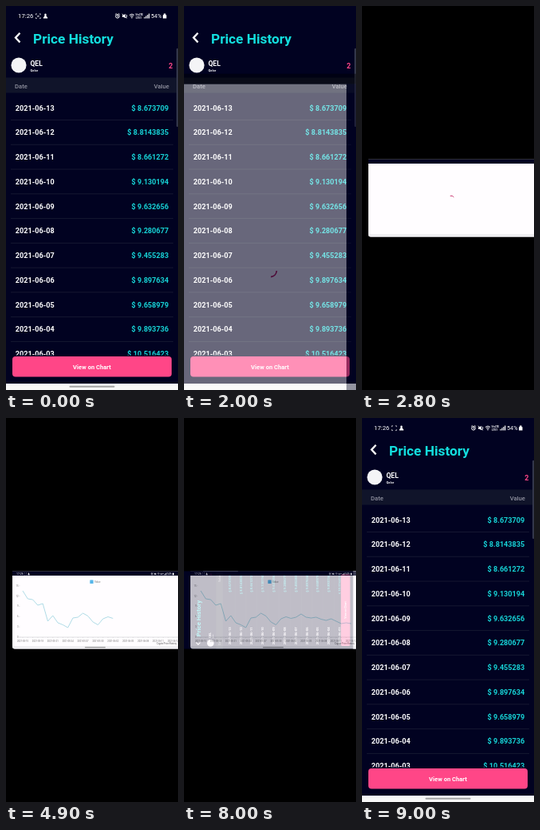
An HTML page that plays this animation: 216 px wide and 480 px high, repeating every 9.1 s.

```html
<!DOCTYPE html>
<html lang="en">
<head>
<meta charset="utf-8">
<title>Price History</title>
<style>
html, body { margin: 0; width: 100%; height: 100%; overflow: hidden; background: #000; }
svg { display: block; width: 100vw; height: 100vh; font-family: Roboto, sans-serif; }
.b { font-weight: 700; }
.m { font-weight: 500; }
.e { text-anchor: end; }
.c { text-anchor: middle; }
</style>
</head>
<body>
<svg viewBox="0 0 216 480">
  <defs>
    <clipPath id="listClip"><rect y="108" width="216" height="328.5"/></clipPath>
    <clipPath id="wideClip"><path d="M8 191.5H216V288.6H11Q8 288.6 8 285.6Z"/></clipPath>
    <clipPath id="lineClip"><rect id="reveal" x="8" y="198" width="0" height="80"/></clipPath>
    <g id="statusL" fill="#fff">
      <text x="15" y="15.4" font-size="7.8">17:26</text>
      <path d="M37.5 11.2V9.8H38.9M41.9 9.8H43.3V11.2M43.3 14.2V15.6H41.9M38.9 15.6H37.5V14.2" fill="none" stroke="#fff" stroke-width=".7"/>
      <path class="rec" d="M39.3 11.6L41.5 13.8M41.5 11.6L39.3 13.8" stroke="#fff" stroke-width=".8"/>
      <path d="M49.5 9.4a1.2 1.2 0 0 1 1 1.9L50.8 13L52.2 14.3V15.4H46.9V14.3L48.2 13L48.5 11.3A1.2 1.2 0 0 1 49.5 9.4Z"/>
    </g>
    <g id="statusR" fill="#fff">
      <g fill="none" stroke="#fff" stroke-width="1">
        <circle cx="140" cy="12.8" r="2.3"/>
        <path d="M140 11.3V13H141.2M137.3 10.4L138.6 9.3M142.7 10.4L141.4 9.3"/>
        <path d="M146 9.8L151.6 15.4M151 10.8Q152.6 12.6 151 14.5"/>
        <path d="M155 11.4Q158 8.8 161 11.4M156.2 13Q158 11.4 159.8 13"/>
      </g>
      <path d="M146 11.5H147.6L149.8 9.8V15.2L147.6 13.8H146Z"/>
      <circle cx="158" cy="14.6" r=".8"/>
      <text x="162.6" y="12.3" font-size="3.4" class="b">VoLTE</text>
      <text x="163" y="15.8" font-size="3.4" class="b">LTE1</text>
      <path d="M173.4 15.6V14H174.6V15.6ZM175.3 15.6V12.6H176.5V15.6ZM177.2 15.6V11H178.4V15.6ZM179.1 15.6V9.5H180.3V15.6Z"/>
      <text x="182" y="15.4" font-size="7.3">54%</text>
      <path d="M197 11.2H198V9.6H200.5V11.2H201.5V15.6H197Z"/>
    </g>
    <path id="arc" d="M8.4 .7A8.5 8.5 0 0 1 1.2 8.4" fill="none" stroke="#c2185b" stroke-width="1.7"/>
  </defs>

  <g id="page">
    <rect width="216" height="480" fill="#010221"/>
    <path d="M17.5 33.8L12 39.6L17.5 45.4" fill="none" stroke="#fff" stroke-width="2.3"/>
    <text x="34" y="47" font-size="17.3" class="b" fill="#13dede">Price History</text>
    <circle cx="16" cy="74" r="9.6" fill="#f4f4f6"/>
    <text x="30.5" y="75.2" font-size="8.5" class="b" fill="#fff">QEL</text>
    <text x="30.5" y="82.4" font-size="4" class="b" fill="#fff">Qelor</text>
    <text x="209.5" y="78.2" font-size="9" class="b e" fill="#ff4687">2</text>
    <rect y="89.5" width="216" height="19.1" fill="#10142a"/>
    <g font-size="7.7" class="m" fill="#8f919f">
      <text x="11" y="102.7">Date</text>
      <text x="205" y="102.7" class="e">Value</text>
    </g>
    <g id="rows" clip-path="url(#listClip)" font-size="9.15" class="b"></g>
    <rect x="8" y="438" width="200" height="25.5" rx="4" fill="#ff4687"/>
    <text x="108" y="454" font-size="7.6" class="b c" fill="#fff">View on Chart</text>
    <rect x="214" y="53" width="3" height="98" rx="1" fill="#33364a"/>
    <rect y="472" width="216" height="8" fill="#f8f8f8"/>
    <g id="chrome">
      <use href="#statusL"/><use href="#statusR"/>
      <rect x="79.5" y="474.8" width="57" height="2" rx="1" fill="#a4a4a4"/>
    </g>
  </g>

  <!-- the chart screen turned upright, while it opens -->
  <g id="sheet">
    <rect width="216" height="13" fill="#000"/>
    <rect y="13" width="204" height="467" fill="#fffdff"/>
    <rect x="204" y="13" width="12" height="467" fill="#010221"/>
    <use id="spinTall" href="#arc"/>
  </g>

  <g id="wide" clip-path="url(#wideClip)">
    <rect x="8" y="191.5" width="208" height="98" fill="#fffdff"/>
    <rect x="8" y="191.5" width="208" height="5.5" fill="#010221"/>
    <rect x="8" y="285" width="208" height="4" fill="#f1f0f3"/>
    <use id="spinWide" href="#arc"/>
    <g id="wideChrome">
      <use href="#statusL" transform="translate(6.3 189.2) scale(.45)"/>
      <use href="#statusR" transform="translate(120.3 189.2) scale(.45)"/>
      <rect x="99" y="286.3" width="26" height=".9" rx=".4" fill="#858585"/>
    </g>
    <g id="chart" fill="#777">
      <rect x="105.4" y="202.5" width="4.3" height="4.4" rx=".5" fill="#56b6e9"/>
      <text x="111" y="205.9" font-size="3.1">Value</text>
      <path d="M17 274H216" stroke="#d2d2d6" stroke-width=".7"/>
      <g id="axes" font-size="2.8"></g>
      <text x="214" y="283.4" font-size="2.8" class="e" fill="#555">Crypto Price History</text>
      <polyline id="line" clip-path="url(#lineClip)" fill="none" stroke="#a6d7e4" stroke-width=".9" stroke-linejoin="round"/>
    </g>
  </g>
</svg>
<script>
const LOOP = 9100;
const $ = id => document.getElementById(id);
const ramp = (t, a, b) => Math.min(1, Math.max(0, (t - a) / (b - a)));
const show = (id, on) => $(id).setAttribute('display', on ? 'inline' : 'none');
const fade = (id, v) => $(id).setAttribute('opacity', v);
const place = (id, v) => $(id).setAttribute('transform', v);

const prices = ['8.673709', '8.8143835', '8.661272', '9.130194', '9.632656', '9.280677',
  '9.455283', '9.897634', '9.658979', '9.893736', '10.516423'];
$('rows').innerHTML = prices.map((p, i) => {
  const y = 130.5 + i * 30.77;
  const day = String(13 - i).padStart(2, '0');
  return `<text x="11.7" y="${y}" fill="#fff">2021-06-${day}</text>
    <text x="204.3" y="${y}" class="e" fill="#17d3d6">$ ${p}</text>
    <path d="M6 ${y + 12}H210" stroke="#1b1d35" stroke-width=".8"/>`;
}).join('');

const X0 = 21, STEP = 6.3;
const heights = [216, 226, 227, 234, 232, 254, 247, 256, 258.5, 262, 250, 249, 244, 247.5, 255, 258.5,
  251, 248.5, 250.5, 249, 245, 249, 250, 249, 251.5, 253, 251, 254, 257, 256, 257];
$('line').setAttribute('points', heights.map((y, i) => `${X0 + i * STEP},${y}`).join(' '));

let labels = '';
for (let i = 0; i < 6; i++) {
  const y = 274 - i * 12.85;
  labels += `<text x="15.6" y="${y + 1}" class="e">${i * 3}</text>
    <path d="M16.2 ${y}H17.4" stroke="#bbb" stroke-width=".4"/>`;
}
for (let i = 0; i < 11; i++) {
  const x = X0 + i * STEP * 3;
  const date = new Date(Date.UTC(2021, 4, 15 + i * 3)).toISOString().slice(0, 10);
  labels += `<text x="${x}" y="279.9" class="c">${date}</text>`;
}
for (let i = 0; i < heights.length; i++) {
  labels += `<path d="M${X0 + i * STEP} 274v.9" stroke="#bbb" stroke-width=".4"/>`;
}
$('axes').innerHTML = labels;

const recs = document.querySelectorAll('.rec');

function draw(t) {
  const blink = Math.floor((t < 4000 ? t : t - 4200) / 500) % 2 === 0;
  recs.forEach(r => r.setAttribute('opacity', blink ? 1 : 0));

  const landscape = t >= 2500 && t < 8500;
  const closing = t >= 7900;
  show('page', !landscape || closing);
  place('page', landscape ? 'translate(0 288.6) rotate(-90) scale(.45)' : '');
  fade('chrome', closing ? ramp(t, 8500, 8900) : 1 - ramp(t, 1300, 1700));

  // loading sheet rises while it becomes opaque
  const p = ramp(t, 1700, 2300);
  show('sheet', p > 0 && t < 2500);
  place('sheet', `translate(0 ${170 * (1 - p)})`);
  fade('sheet', Math.min(1, 1.6 * p * p));

  const turn = (t - 2000) * 605 / 800;
  place('spinTall', `translate(108 245.5) rotate(${turn})`);
  place('spinWide', `translate(112 241) scale(.45) rotate(${turn})`);
  show('spinWide', t < 3400);

  show('wide', landscape);
  fade('wide', 1 - ramp(t, 7900, 8300));
  fade('wideChrome', ramp(t, 3300, 3800));
  show('chart', t >= 4500);
  $('reveal').setAttribute('width', 13 + 190 * ramp(t, 4400, 5240));
}

const start = performance.now();
function tick() {
  draw((performance.now() - start) % LOOP);
  requestAnimationFrame(tick);
}
tick();
</script>
</body>
</html>
```
